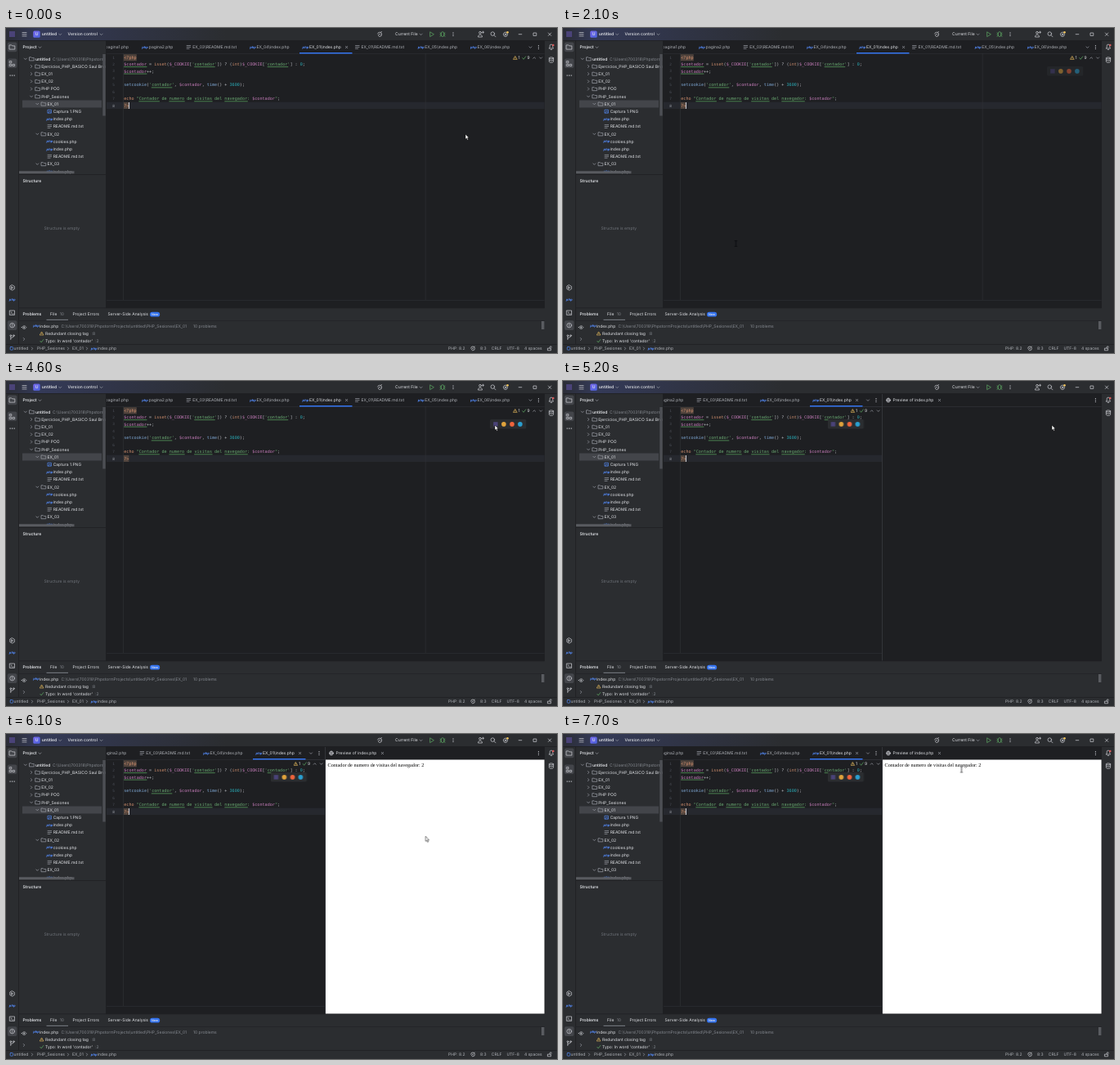
An HTML page that plays this animation: 674 px wide and 398 px high, repeating every 8 s.

```html
<!DOCTYPE html>
<html lang="es">
<head>
<meta charset="utf-8">
<title>Editor</title>
<style>
html, body { margin: 0; width: 100%; height: 100%; overflow: hidden; background: #2b2d30; }
svg { display: block; width: 674px; height: 398px; }
text { font: 5.03px Inter, sans-serif; fill: #dfe1e5; white-space: pre; text-rendering: geometricPrecision; }
.b { font-weight: 600; }
.dim, .dim text { fill: #868a91; }
.mid text { fill: #b0b3b9; }
.php { font: italic 700 4.1px Inter, sans-serif; fill: #548af7; }
.code text { font: 5.12px "DejaVu Sans Mono", monospace; fill: #bcbec4; }
.code .k { fill: #cf8e6d; }
.code .v { fill: #c77dbb; }
.code .s { fill: #6aab73; }
.code .n { fill: #2aacb8; }
.code .f { fill: #7fa9d6; }
.num text { font: 4.4px "DejaVu Sans Mono", monospace; fill: #4b5059; text-anchor: middle; }
.num .now { fill: #a1a3ab; }
.web { font: 6.17px "Liberation Serif", serif; fill: #000; }
.line { fill: none; stroke: #ced0d6; stroke-width: .7; stroke-linecap: round; stroke-linejoin: round; }
.soft { stroke: #9da0a8; }
.green { stroke: #5fad65; }

.tabs, .tools, .split, .page, .popup, .caret, .cursor { animation: 8s step-end infinite; }
.tabs { animation-name: tabs; }
.tools { animation-name: tools; }
.split { animation-name: split; }
.page { animation-name: page; }
.popup { animation-name: popup; }
.caret { animation-name: blink; }
.cursor { animation-name: move, kind; }
.arrow { opacity: calc(1 - var(--beam)); }
.beam { opacity: var(--beam); }

@keyframes tabs { 0% { transform: none; } 60%, 100% { transform: translateX(-57px); } }
@keyframes tools { 0% { transform: none; } 60%, 100% { transform: translateX(-268.5px); } }
@keyframes split { 0% { opacity: 0; } 60%, 100% { opacity: 1; } }
@keyframes page { 0% { opacity: 0; } 66.25%, 100% { opacity: 1; } }
@keyframes popup {
  0%, 78.75% { opacity: 0; }
  23.75% { opacity: 0; animation-timing-function: steps(4); }
  28.75%, 88.75%, 100% { opacity: 1; }
}
@keyframes blink {
  0%, 10%, 22.5%, 35%, 47.5%, 60%, 71.25%, 83.75%, 96.25%, 100% { opacity: 1; }
  3.75%, 16.25%, 28.75%, 41.25%, 53.75%, 67.5%, 77.5%, 90% { opacity: 0; }
}
@keyframes kind {
  0%, 28.75%, 53.75%, 90% { --beam: 0; }
  1.25%, 42.5%, 85%, 96.25%, 100% { --beam: 1; }
}
@keyframes move {
  0% { transform: translate(562px, 130px); }
  1.25% { transform: translate(572px, 136px); }
  2.5% { transform: translate(572px, 136px); animation-timing-function: steps(3); }
  6.25% { transform: translate(592px, 138px); }
  8.75% { transform: translate(592px, 138px); animation-timing-function: steps(2); }
  11.25% { transform: translate(590px, 137.5px); }
  17.5% { transform: translate(590px, 137.5px); animation-timing-function: steps(4); }
  22.5% { transform: translate(390px, 355px); animation-timing-function: steps(3); }
  26.25% { transform: translate(211.5px, 264px); animation-timing-function: steps(2); }
  28.75% { transform: translate(48px, 229px); animation-timing-function: steps(2); }
  31.25% { transform: translate(50px, 238px); }
  32.5% { transform: translate(50px, 238px); animation-timing-function: steps(4); }
  37.5% { transform: translate(303px, 18px); }
  40% { transform: translate(303px, 18px); animation-timing-function: steps(4); }
  45% { transform: translate(313px, 68.5px); }
  51.25% { transform: translate(313px, 68.5px); animation-timing-function: steps(2); }
  53.75% { transform: translate(450px, 24px); animation-timing-function: steps(2); }
  56.25% { transform: translate(612px, 46px); }
  57.5%, 65% { transform: translate(598px, 54px); }
  66.25% { transform: translate(573.3px, 87px); animation-timing-function: steps(2); }
  68.75% { transform: translate(521px, 157px); animation-timing-function: steps(2); }
  71.25% { transform: translate(459px, 129px); animation-timing-function: steps(3); }
  75% { transform: translate(480px, 140px); animation-timing-function: steps(4); }
  80% { transform: translate(613px, 81px); animation-timing-function: steps(5); }
  86.25% { transform: translate(301.5px, 98px); animation-timing-function: steps(4); }
  91.25% { transform: translate(400px, 6px); animation-timing-function: steps(4); }
  96.25%, 100% { transform: translate(487.5px, 43.5px); }
}
</style>
</head>
<body>
<svg viewBox="0 0 674 398">
  <defs>
    <linearGradient id="tint"><stop offset="0" stop-color="#2b2d36"/><stop offset=".06" stop-color="#343a58"/><stop offset=".4" stop-color="#2b2d30"/></linearGradient>
    <linearGradient id="badge" x2="1" y2="1"><stop offset="0" stop-color="#7a6af0"/><stop offset="1" stop-color="#4a62dc"/></linearGradient>
    <clipPath id="treeBox"><path d="M16 32h105.5v146.5H16z"/></clipPath>
    <clipPath id="tabBox"><path d="M123 16h510v16H123z"/></clipPath>
    <clipPath id="issueBox"><path d="M16 358h640v29H16z"/></clipPath>
    <text id="php" class="php" x="-3.8" y="1.3">php</text>
    <path id="doc" class="line soft" d="M-2.3-2h4.6M-2.3-.1h4.6M-2.3 1.8h3"/>
    <path id="dir" class="line soft" d="M-2.7-2h2l.8.8h2.6v3.3h-5.4z"/>
    <path id="pic" class="line" style="stroke:#548af7" d="M-2-2h4v4h-4zM-1.6 1.6l1.4-2 1.8 1.4"/>
    <path id="down" class="line soft" d="M-1.5-.7 0 .8 1.5-.7"/>
    <path id="up" class="line soft" d="M-1.5.7 0-.8 1.5.7"/>
    <path id="right" class="line soft" d="M-.7-1.5.8 0-.7 1.5"/>
    <path id="close" class="line soft" d="M-1.2-1.2 1.2 1.2M1.2-1.2-1.2 1.2"/>
    <path id="more" d="M-.5-2.4h1v1h-1zM-.5-.5h1v1h-1zM-.5 1.4h1v1h-1z" fill="#ced0d6"/>
    <path id="warn" class="line" style="stroke:#d6ae58" d="M0-1.9 2.2 1.8h-4.4zM0-.5v1"/>
    <path id="tick" class="line green" d="M-2 0l1.4 1.7L2-1.8"/>
  </defs>

  <!-- frame -->
  <path fill="#2b2d30" d="M0 0h674v398H0z"/>
  <path fill="url(#tint)" d="M0 0h674v15H0z"/>
  <path fill="#1e1f22" d="M0 15h674v.7H0zM15 15h.7v372H15zM122 15h537v328H122zM16 179h107v.8H16zM16 342.5h643v.8H16zM0 387h674v.7H0z"/>

  <!-- header -->
  <rect x="4" y="4" width="7" height="7" fill="#4a4378"/>
  <path class="line" d="M20 5.5h5M20 7.7h5M20 9.9h5"/>
  <rect x="33.3" y="3.4" width="8.4" height="8.4" rx="1.6" fill="url(#badge)"/>
  <text class="b" x="35.7" y="9.4">U</text>
  <text class="b" x="43.8" y="9.4">untitled</text><use href="#down" x="66.2" y="7.8"/>
  <text class="b" style="font-weight:500" x="75.6" y="9.4">Version control</text><use href="#down" x="116.6" y="7.8"/>
  <path class="line" d="M454.6 7a2.6 2.6 0 1 1 2.6 3.4 1.5 1.5 0 1 1 1-2.4M459.5 4.3l-1.2 1.4"/>
  <text x="476" y="9.4">Current File</text><use href="#down" x="507.6" y="7.8"/>
  <path class="line green" d="M519 5l4.4 2.7-4.4 2.7z"/>
  <path class="line green" d="M532.2 6.5a1.8 1.8 0 0 1 3.6 0v2.2a1.8 1.8 0 0 1-3.6 0zM531 6l1.2.7M537 6l-1.2.7M531 8h1.2M537 8h-1.2M531 10.2l1.2-.7M537 10.2l-1.2-.7"/>
  <use href="#more" x="547" y="7.7"/>
  <path class="line" d="M577.5 10.6c0-3.4 5-3.4 5 0zM582.5 5.2h2.2M583.6 4.1v2.2"/><circle class="line" cx="580" cy="5.7" r="1.4"/>
  <circle class="line" cx="595.3" cy="7.1" r="2.3"/><path class="line" d="M597 8.8l2 2"/>
  <circle class="line" cx="611" cy="7.8" r="2.6" stroke-dasharray="1.6 .5"/><circle class="line" cx="611" cy="7.8" r=".9"/><circle cx="613.5" cy="5.2" r="1.3" fill="#f2c55c"/>
  <path class="line" d="M627.2 7.7h3.6M645.4 6h3.4v3.4h-3.4zM663.4 6l3.4 3.4M666.8 6l-3.4 3.4"/>

  <!-- side strips -->
  <g fill="#43454a"><rect x="1.8" y="17.6" width="11.6" height="11.6" rx="2"/><rect x="1.8" y="37.4" width="11.6" height="11.6" rx="2"/><rect x="1.8" y="358.3" width="11.6" height="11.6" rx="2"/></g>
  <path class="line" d="M4.4 20.9h2.4l1 1h3v4.2H4.4z"/>
  <path class="line" d="M4.6 40.6h2.2v2.2H4.6zM4.6 44.4h2.2v2.2H4.6zM8.4 44.4h2.2v2.2H8.4z"/>
  <path d="M4.6 57.6h1.1v1.1H4.6zM7.1 57.6h1.1v1.1H7.1zM9.6 57.6h1.1v1.1H9.6z" fill="#ced0d6"/>
  <path class="line" d="M7.6 314.8l2.8 1.6v3.2l-2.8 1.6-2.8-1.6v-3.2zM6.8 316.8l2 1.2-2 1.2z"/>
  <use href="#php" x="7.6" y="333"/>
  <path class="line" d="M4.7 346h5.8v5.4H4.7zM6 347.6l1.2 1-1.2 1M8 350h1.2"/>
  <circle class="line" cx="7.6" cy="364.1" r="2.8"/><path class="line" d="M7.6 362.6v1.7M7.6 365.6v.1"/>
  <path class="line" d="M5.8 377.6v4M5.8 380c0-1.4 3.6-.4 3.6-2.4"/><circle class="line" cx="5.8" cy="376.7" r=".9"/><circle class="line" cx="9.4" cy="376.7" r=".9"/>
  <path class="line" d="M664.4 25h5.2l-.8-1.3v-1.8a1.8 1.8 0 0 0-3.6 0v1.8zM666.3 26.4h1.4"/><circle cx="669.3" cy="21" r="1.3" fill="#db5c5c"/>
  <ellipse class="line" cx="667" cy="36.9" rx="2.6" ry="1"/><path class="line" d="M664.4 36.9v4.4c0 1.3 5.2 1.3 5.2 0v-4.4M664.4 39.1c0 1.3 5.2 1.3 5.2 0"/>

  <!-- project panel -->
  <text class="b" x="20.5" y="25.3">Project</text><use href="#down" x="41.5" y="23.7"/>
  <g clip-path="url(#treeBox)"><path fill="#43454a" d="M20 88.4h97v9.2H20z"/><g id="tree"></g></g>
  <path fill="#4d4f54" d="M118.3 32h3.4v75.5h-3.4z"/>
  <path fill="#595b60" d="M16 175.2h67.5v3.1H16z"/>
  <text class="b" x="20.5" y="188.8">Structure</text>
  <text x="46.5" y="247" style="fill:#6f737a">Structure is empty</text>

  <!-- editor -->
  <path fill="#26282e" d="M123 90.7h535.5v8.4H123z"/>
  <path fill="#313438" d="M143.2 31.5h.6V333h-.6zM512.8 31.5h.6V333h-.6zM123 333h535.5v.6H123zM123 31h535.5v.6H123z"/>
  <path fill="#51443d" d="M144 32.2h15.8v8H144zM144 91h6.4v8H144z"/>
  <g class="num" id="numbers"></g>
  <g class="code">
    <text x="144.3" y="37.6" class="k">&lt;?php</text>
    <text x="144.3" y="46"><tspan class="v">$contador</tspan> = <tspan class="k">isset</tspan>(<tspan class="v">$_COOKIE</tspan>[<tspan class="s">'contador'</tspan>]) ? (<tspan class="k">int</tspan>)<tspan class="v">$_COOKIE</tspan>[<tspan class="s">'contador'</tspan>] : <tspan class="n">0</tspan>;</text>
    <text x="144.3" y="54.5"><tspan class="v">$contador</tspan>++;</text>
    <text x="144.3" y="71.3"><tspan class="f">setcookie</tspan>(<tspan class="s">'contador'</tspan>, <tspan class="v">$contador</tspan>, <tspan class="f">time</tspan>() + <tspan class="n">3600</tspan>);</text>
    <text x="144.3" y="88.2"><tspan class="k">echo</tspan> <tspan class="s">"Contador de numero de visitas del navegador: <tspan class="v">$contador</tspan>"</tspan>;</text>
    <text x="144.3" y="96.6" class="k">?&gt;</text>
  </g>
  <path class="line green" d="M144.6 47.6H172M230.7 47.6h24.6M320.1 47.6h24.7M144.6 56.1H172M178.2 72.9h24.7M162.8 89.8h24.7M199.8 89.8h18.5M230.6 89.8h21.6M267.7 89.8h27.7"/>
  <path class="caret" fill="#ced0d6" d="M150 91h1v8h-1z"/>

  <!-- tabs -->
  <g clip-path="url(#tabBox)">
    <g class="tabs mid">
      <path fill="#3574f0" d="M359 29.9h64.5v1.5H359z"/>
      <text x="121.6" y="25.3">pagina1.php</text>
      <use href="#php" x="170" y="23.6"/><text x="174.8" y="25.3">pagina2.php</text>
      <use href="#doc" x="223.4" y="23.5"/><text x="228.2" y="25.3">EX_03\README.md.txt</text>
      <use href="#php" x="302" y="23.6"/><text x="306.4" y="25.3">EX_04\index.php</text>
      <use href="#php" x="366.4" y="23.6"/><text x="371" y="25.3" style="fill:#dfe1e5">EX_01\index.php</text><use href="#close" x="416.6" y="23.5"/>
      <use href="#doc" x="429.8" y="23.5"/><text x="434.4" y="25.3">EX_01\README.md.txt</text>
      <use href="#php" x="507.6" y="23.6"/><text x="512.2" y="25.3">EX_05\index.php</text>
      <use href="#php" x="571.8" y="23.6"/><text x="576.4" y="25.3">EX_06\index.php</text>
    </g>
  </g>
  <use href="#down" x="641.5" y="23.6"/><use href="#more" x="651.4" y="23.5"/>

  <!-- preview pane -->
  <g class="split">
    <path fill="#1e1f22" d="M367 16h291.8v15H367zM390 31h268.8v311.5H390z"/>
    <path fill="#393b40" d="M390 16h.8v326.5h-.8zM367 31h291.5v.6H367z"/>
    <use href="#down" x="373" y="23.6"/><use href="#more" x="383" y="23.5"/>
    <circle class="line" cx="398" cy="23.5" r="2.4"/><path class="line" d="M395.7 23.5h4.6M398 21.1c-1.6 1.6-1.6 3.2 0 4.8 1.6-1.6 1.6-3.2 0-4.8"/>
    <text x="403.6" y="25.3">Preview of index.php</text><use href="#close" x="460.5" y="23.5"/>
    <use href="#more" x="651.4" y="23.5"/>
  </g>
  <g class="page">
    <path fill="#fff" d="M391 31.4h267.6v311H391z"/>
    <text class="web" x="393.6" y="40">Contador de numero de visitas del navegador: 2</text>
  </g>

  <g class="tools">
    <use href="#warn" x="623" y="36.6"/><text x="626.6" y="38.3">1</text>
    <use href="#tick" x="633.8" y="36.6"/><text x="637.4" y="38.3">9</text>
    <use href="#up" x="646.2" y="36.6"/><use href="#down" x="654.2" y="36.6"/>
    <g class="popup">
      <rect x="592" y="47" width="44.3" height="11.6" rx="1.5" fill="#2b2d30"/>
      <rect x="596.2" y="50.2" width="5.4" height="5.4" fill="#4a4378"/>
      <circle cx="608.9" cy="52.9" r="2.8" fill="#e0a33c"/>
      <circle cx="619" cy="52.9" r="2.8" fill="#f0643c"/>
      <circle cx="628.9" cy="52.9" r="2.8" fill="#2a9fd0"/>
    </g>
  </g>

  <!-- problems panel -->
  <text class="b" x="20.5" y="352.4">Problems</text>
  <text x="54" y="352.4">File</text><text class="dim" x="65.8" y="352.4">10</text>
  <text x="81.6" y="352.4">Project Errors</text>
  <text x="124.6" y="352.4">Server-Side Analysis</text>
  <rect x="176" y="347.8" width="12.2" height="5.8" rx="2.9" fill="#3574f0"/><text class="b" x="178" y="352" style="font-size:3.7px">New</text>
  <path fill="#1e1f22" d="M16 358h643v.6H16z"/>
  <path fill="#6f737a" d="M49.5 356.8H76v1.2H49.5z"/>
  <path class="line" d="M19.4 366.6c1.6-2.4 4-2.4 5.4 0-1.4 2.4-3.8 2.4-5.4 0z"/><circle cx="22.1" cy="366.6" r=".9" fill="#ced0d6"/>
  <use href="#right" x="22" y="381"/>
  <g clip-path="url(#issueBox)">
    <use href="#php" x="37" y="365"/><text x="41" y="366.7">index.php</text>
    <text class="dim" x="67.4" y="366.7">C:\Users\700318\PhpstormProjects\untitled\PHP_Sesiones\EX_01</text><text class="dim" x="229" y="366.7">10 problems</text>
    <use href="#warn" x="43.8" y="374.2"/><text x="48" y="375.9">Redundant closing tag</text><text class="dim" x="104.6" y="375.9">:8</text>
    <use href="#tick" x="43.8" y="383.3"/><text x="48" y="385">Typo: In word 'contador'</text><text class="dim" x="109" y="385">:2</text>
  </g>
  <path fill="#595b60" d="M655 359h3.4v10H655z"/>

  <!-- status bar -->
  <g class="mid">
    <rect class="line" style="stroke:#548af7" x="5.2" y="390.6" width="3.4" height="3.6" rx=".7"/>
    <text x="9.6" y="394.2">untitled</text><use href="#right" x="32" y="392.5"/>
    <text x="38" y="394.2">PHP_Sesiones</text><use href="#right" x="76" y="392.5"/>
    <text x="81" y="394.2">EX_01</text><use href="#right" x="99" y="392.5"/>
    <use href="#php" x="107.6" y="392.5"/><text x="111.8" y="394.2">index.php</text>
    <text x="541" y="394.2">PHP: 8.2</text>
    <path class="line" d="M568.6 392.2a2.4 2.4 0 1 1 2.4 2.6 1.3 1.3 0 1 1 .9-2.1M573.2 390l-1 1.1"/>
    <text x="580" y="394.2">8:3</text><text x="593.8" y="394.2">CRLF</text>
    <text x="612.4" y="394.2">UTF-8</text><text x="634" y="394.2">4 spaces</text>
    <path class="line" d="M662.8 392.2h3.8v2.6h-3.8zM665.2 392v-1a1.1 1.1 0 0 1 2.2 0"/>
  </g>

  <!-- pointer -->
  <g class="cursor">
    <path class="arrow" d="M0 0v6.2l1.4-1.2 1 2.2 1.1-.5-1-2.1h1.8z" fill="#fff" stroke="#000" stroke-width=".5"/>
    <path class="beam" d="M-1.5-3.4h1.1l.4.3.4-.3h1.1M0-3.1v6.2M-1.5 3.4h1.1l.4-.3.4.3h1.1" fill="none" stroke="#050506" stroke-width=".7"/>
  </g>
</svg>
<script>
// depth, icon, label, chevron
const rows = [
  [0, "dir", "untitled", "down"],
  [1, "dir", "Ejercicios_PHP_BASICO Saul Bremo", "right"],
  [1, "dir", "EX_01", "right"],
  [1, "dir", "EX_02", "right"],
  [1, "dir", "PHP POO", "right"],
  [1, "dir", "PHP_Sesiones", "down"],
  [2, "dir", "EX_01", "down"],
  [3, "pic", "Captura 1.PNG"],
  [3, "php", "index.php"],
  [3, "doc", "README.md.txt"],
  [2, "dir", "EX_02", "down"],
  [3, "php", "cookies.php"],
  [3, "php", "index.php"],
  [3, "doc", "README.md.txt"],
  [2, "dir", "EX_03", "down"],
  [3, "php", "index.php"]
];
const use = (id, x, y) => `<use href="#${id}" x="${x}" y="${y}"/>`;
const label = (x, y, str, cls = "") => `<text class="${cls}" x="${x}" y="${y}">${str}</text>`;

document.getElementById("tree").innerHTML = rows.map(([depth, icon, name, chevron], i) => {
  const x = 31.6 + depth * 7.25, y = 37.8 + i * 9.2;
  return (chevron ? use(chevron, x - 7.8, y) : "") + use(icon, x, y) +
    label(x + 4.3, y + 1.8, name, i ? "" : "b");
}).join("") + label(57, 39.6, "C:\\Users\\700318\\PhpstormProjects", "dim");

document.getElementById("numbers").innerHTML = Array.from({ length: 8 }, (_, i) =>
  label(131.6, 37.6 + i * 8.43, i + 1, i === 7 ? "now" : "")).join("");
</script>
</body>
</html>
```
